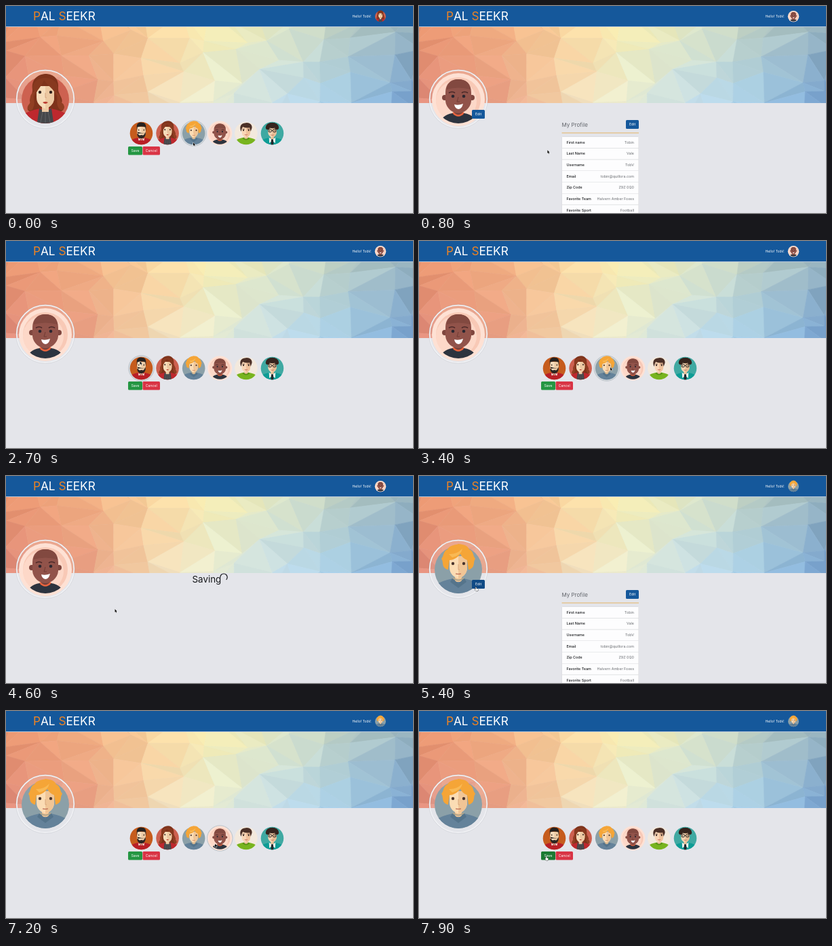
Animation, 600 px wide and 305 px high, one loop 8 s. Source, as an HTML page with a canvas:

```html
<!DOCTYPE html>
<html lang="en">
<head>
<meta charset="utf-8">
<title>Profile avatar picker</title>
<style>
html, body { margin: 0; width: 100%; height: 100%; overflow: hidden; background: #e4e5ea; }
canvas { display: block; width: 600px; height: 305px; }
</style>
</head>
<body>
<canvas id="stage"></canvas>
<script>
const W = 600, H = 305, LOOP = 8000, STEP = 100;
const BLUE = '#15589b';
const stage = document.getElementById('stage');
const g = stage.getContext('2d');
const dpr = window.devicePixelRatio || 1;
stage.width = W * dpr;
stage.height = H * dpr;

// ---- drawing helpers ----
function rect(x, y, w, h, c, r = 0) {
  g.fillStyle = c;
  g.beginPath();
  g.roundRect(x, y, w, h, r);
  g.fill();
}
function ell(x, y, rx, ry, c) {
  g.fillStyle = c;
  g.beginPath();
  g.ellipse(x, y, rx, ry, 0, 0, 7);
  g.fill();
}
const disc = (x, y, r, c) => ell(x, y, r, r, c);
function ring(x, y, r, w, c, from = 0, to = Math.PI * 2) {
  g.strokeStyle = c;
  g.lineWidth = w;
  g.beginPath();
  g.arc(x, y, r, from, to);
  g.stroke();
}
function shape(d, c) {
  g.fillStyle = c;
  g.fill(new Path2D(d));
}
function line(d, w, c) {
  g.strokeStyle = c;
  g.lineWidth = w;
  g.stroke(new Path2D(d));
}
function text(s, x, y, size, c, align = 'left', weight = 400) {
  g.font = `${weight} ${size}px Inter, Roboto, sans-serif`;
  g.textAlign = align;
  g.fillStyle = c;
  g.fillText(s, x, y);
  return g.measureText(s).width;
}
function button(s, x, y, w, h, c) {
  rect(x, y, w, h, c, 1.5);
  text(s, x + w / 2, y + h / 2 + 1.9, 5.2, '#fff', 'center');
}
function clipped(path, draw) {
  g.save();
  g.clip(path);
  draw();
  g.restore();
}

// ---- low-poly banner ----
const TOP = ['e9946f', 'f0a97f', 'f8cf9a', 'f8f0b6', 'e2e9c8', 'b9cdc6', '93b0bd'];
const LOW = ['e08a7a', 'ec9f85', 'f5cfa6', 'ebefd4', 'c6e0ec', 'a0cae5', '759fcd'];
const rgb = h => [0, 2, 4].map(i => parseInt(h.slice(i, i + 2), 16));
const mix = (a, b, k) => a.map((v, i) => v + (b[i] - v) * k);

function tone(x, y) {
  const u = Math.min(Math.max(x / 100, 0), 5.999), i = Math.floor(u);
  const at = row => mix(rgb(row[i]), rgb(row[i + 1]), u - i);
  return mix(at(TOP), at(LOW), Math.min(Math.max((y - 31) / 112, 0), 1));
}
let seed = 29;
function rand() {
  seed = (seed * 16807) % 2147483647;
  return seed / 2147483647;
}
const facets = [];
{
  const cols = 16, rows = 5, pts = [];
  for (let j = 0; j <= rows; j++) {
    for (let i = 0; i <= cols; i++) {
      pts.push([(i - 1) * 43 + (rand() - .5) * 32, 14 + j * 30 + (rand() - .5) * 22]);
    }
  }
  const add = (...tri) => {
    const cx = (tri[0][0] + tri[1][0] + tri[2][0]) / 3;
    const cy = (tri[0][1] + tri[1][1] + tri[2][1]) / 3;
    const d = (rand() - .5) * 13;
    const c = tone(cx + (rand() - .5) * 16, cy).map(v => Math.round(Math.min(255, v + d)));
    facets.push([tri, `rgb(${c})`]);
  };
  for (let j = 0; j < rows; j++) {
    for (let i = 0; i < cols; i++) {
      const n = j * (cols + 1) + i;
      const a = pts[n], b = pts[n + 1], c = pts[n + cols + 1], d = pts[n + cols + 2];
      if (rand() < .5) { add(a, b, c); add(b, c, d); }
      else { add(a, b, d); add(a, c, d); }
    }
  }
}
function banner() {
  const box = new Path2D();
  box.rect(0, 31, W, 112);
  clipped(box, () => {
    g.lineWidth = .6;
    for (const [tri, c] of facets) {
      g.fillStyle = g.strokeStyle = c;
      g.beginPath();
      for (const p of tri) g.lineTo(...p);
      g.closePath();
      g.fill();
      g.stroke();
    }
  });
}

// ---- avatars, drawn around 0,0 with radius 35 ----
const round = new Path2D();
round.arc(0, 0, 35, 0, 7);
const rightHalf = new Path2D();
rightHalf.rect(0, -50, 50, 100);
const FACE = 'M-13-20H13V-3C13 6 6 12 0 13C-6 12-13 6-13-3Z';
const SHOULDERS = 'M-38 40L-32 22Q-27 17-8 13H8Q27 17 32 22L38 40Z';

function head(light, dark) {
  rect(-5, 6, 10, 12, dark);
  shape(FACE, light);
  clipped(rightHalf, () => shape(FACE, dark));
}
function eyes(y, c = '#33241f', r = 2.2) {
  disc(-8, y, r, c);
  disc(8, y, r, c);
}
const body = c => clipped(round, () => shape(SHOULDERS, c));

const avatars = {
  beard() {
    disc(0, 0, 35, '#c65c1d');
    body('#b91f27');
    head('#f6dcbc', '#eccba5');
    shape('M-14-5V-18C-15-30-8-34 2-33C13-33 16-26 14-5L12-19Q0-23-12-19Z', '#26211f');
    shape('M-13-4L-10 1Q0-1 10 1L13-4V3C12 11 6 16 0 16C-6 16-12 11-13 3L-10 1Q-7 8-4 6Q0 4 4 6Q7 8 10 1Z', '#2c2522');
    shape('M-10 14L0 22L10 14L8 23L0 19L-8 23Z', '#efe3d8');
    eyes(-10, '#33241f', 1.8);
  },
  redhead() {
    disc(0, 0, 35, '#cd6150');
    shape('M-20 6C-27 1-18-7-19-15C-21-31-10-38 2-38C15-37 20-28 19-17C18-8 27-3 24 5C31 10 27 18 20 18H-19C-29 17-28 11-20 6Z', '#7e331b');
    body('#be282e');
    shape('M-9 13L0 17L9 13L12 33Q0 37-12 33Z', '#45474a');
    line('M-4 18L-7 33M4 18L7 33M0 18V34', .7, '#6c6d70');
    head('#f6dcba', '#edc9a2');
    shape('M-16-4C-13-14-5-20-2-29C3-20 13-17 16-5L19-18C15-37-16-37-19-18Z', '#87391f');
    shape('M-14-14C-21-5-13 3-18 12C-19 19-30 16-25 8C-19 3-26-3-19-10Z M14-12C21-4 14 4 20 13C24 19 31 13 26 6C20 2 25-4 18-10Z', '#913f23');
    eyes(-11);
    line('M0-10V-3H2', .9, '#d3a17b');
    shape('M-4 4Q0 2 4 4Q0 8-4 4Z', '#bb3a30');
  },
  blond() {
    disc(0, 0, 35, '#8ba0a8');
    body('#64829a');
    head('#fbdcb4', '#f0c596');
    shape('M-9 13L0 20L9 13L12 18L0 27L-12 18Z', '#55748b');
    line('M-8 12Q0 19 8 12', 1.8, '#b0a58b');
    shape('M-15 0C-26-3-21-11-25-16C-21-20-23-27-16-30C-12-37-4-36 0-38C6-37 13-37 16-30C23-27 21-21 25-16C21-11 26-3 15 0L13-14C8-16 5-19 3-23C-2-17-8-14-13-14Z', '#f5a537');
    shape('M-14-23Q-3-22 6-31Q4-21-9-18Z', '#f9b954');
    eyes(-9, '#4b352d');
    line('M0-8V0H2', .8, '#d3a077');
    line('M-4 6Q0 7 4 6', 1.2, '#b8664f');
  },
  bald() {
    disc(0, 0, 39, '#fee1d4');
    disc(0, 0, 33, '#f8c9b6');
    disc(-3, 2, 30, '#fdd8c8');
    clipped(round, () => shape('M-27 37Q-26 23-9 20H9Q26 23 27 37Z', '#2d343f'));
    rect(-7, 9, 14, 14, '#74403a');
    disc(-20, -3, 4, '#7f463e');
    disc(20, -3, 4, '#7f463e');
    shape('M-19-10C-19-25-10-30 0-30C11-30 19-24 19-10V2C18 13 8 20 0 20C-8 20-18 13-19 2Z', '#91534a');
    shape('M-18-15C-14-28-6-30 0-30C10-30 17-25 18-15Q0-20-18-15Z', '#824940');
    line('M-8 19Q0 28 8 19', 2.6, '#e9653f');
    line('M-14-10Q-9-13-5-10M5-10Q9-13 14-10', 1.6, '#4a2827');
    eyes(-5, '#2b2730', 2.3);
    line('M0-4L-2 3H2', 1, '#713b34');
    shape('M-6 7Q0 9 7 6Q5 14 0 14Q-5 13-6 7Z', '#fff');
  },
  green() {
    disc(0, 0, 35, '#f3e9dd');
    body('#78b41f');
    head('#f9d6b6', '#f0c29c');
    shape('M-8 13Q0 21 8 13L11 16Q0 26-11 16Z', '#5b9118');
    shape('M-15-5C-21-16-18-30-4-31C6-35 20-29 18-16L14-5L11-17Q-2-15-10-20L-13-14Z', '#4b3027');
    line('M-11-13H-4M4-13H11', 1.5, '#4b3027');
    eyes(-9);
    line('M-4 4Q0 7 4 4', 1.6, '#b94e42');
  },
  curly() {
    disc(0, 0, 35, '#3fa9a2');
    body('#0d9c95');
    head('#f4d5b3', '#e8be96');
    shape('M-10 13L0 20L10 13L9 30L0 23L-9 30Z', '#f2f0eb');
    shape('M-3 19H3L4 35H-4Z', '#25282b');
    for (let i = 0; i < 9; i++) {
      const a = Math.PI * (1 + i / 8);
      disc(Math.cos(a) * 14, -17 + Math.sin(a) * 10, 6, '#35241e');
    }
    ell(0, -22, 13, 7, '#35241e');
    ring(-7, -8, 5, 2, '#2c2725');
    ring(7, -8, 5, 2, '#2c2725');
    line('M-3-8H3', 1.6, '#2c2725');
    eyes(-8, '#2c2725', 1.6);
    line('M-4 5Q0 7 4 5', 1.4, '#a94b3e');
  }
};
function avatar(name, x, y, r) {
  g.save();
  g.translate(x, y);
  g.scale(r / 35, r / 35);
  avatars[name]();
  g.restore();
}

// ---- timeline ----
const views = [
  [0, 'pick', 'redhead'], [400, 'saving', 'redhead'], [700, 'profile', 'bald'],
  [2100, 'pick', 'bald'], [4300, 'saving', 'bald'],
  [4800, 'profile', 'blond'], [5600, 'pick', 'blond']
];
const moves = [
  [0, 276, 201], [300, 189, 213], [1100, 189.5, 212],
  [1800, 82.5, 163.5], [2300, 82.5, 163.5], [3000, 272, 186], [3400, 282, 186],
  [3800, 280, 187], [4150, 189, 213], [4400, 188, 212], [4600, 160.5, 196],
  [5200, 84, 163.5], [5600, 83, 163.5], [6100, 350, 188], [6300, 364.5, 186],
  [6900, 364, 187], [7700, 187, 214], [8000, 187, 214]
];
function pointerAt(t) {
  const i = moves.findIndex(m => m[0] > t);
  const a = moves[i - 1], b = moves[i];
  const k = (t - a[0]) / (b[0] - a[0]), e = k * k * (3 - 2 * k);
  return [a[1] + (b[1] - a[1]) * e, a[2] + (b[2] - a[2]) * e];
}
const over = ([px, py], x, y, w, h) => px >= x && px <= x + w && py >= y && py <= y + h;

function cursor([x, y], hand) {
  g.save();
  g.translate(x, y);
  const p = new Path2D(hand
    ? 'M0 0Q.9-.3 1 .7V2.3L3 2.8Q3.8 3 3.6 4L3.1 6H.4L-1.4 3.6Q-1 2.8 0 3.5Z'
    : 'M0 0V4.8L1.1 3.9L1.9 5.6L2.7 5.2L1.9 3.6L3.3 3.4Z');
  g.lineWidth = .9;
  g.strokeStyle = hand ? '#222' : '#fff';
  g.stroke(p);
  g.fillStyle = hand ? '#fff' : '#111';
  g.fill(p);
  g.restore();
}

// ---- screens ----
const fields = [
  ['First name', 'Tobin'], ['Last Name', 'Vale'], ['Username', 'TobV'],
  ['Email', 'tobin@quillora.com'], ['Zip Code', 'Z9Z 0Q0'],
  ['Favorite Team', 'Halvern Amber Foxes'], ['Favorite Sport', 'Football']
];
function header(user) {
  rect(0, 0, W, 30.3, BLUE);
  let x = 40;
  for (const [s, c] of [['P', '#ee8322'], ['AL ', '#fff'], ['S', '#ee8322'], ['EEKR', '#fff']]) {
    x += text(s, x, 21, 17.2, c);
  }
  text('Hello! TobV.', 539, 17.2, 5.1, '#fff', 'right');
  avatar(user, 552, 15.3, user === 'bald' ? 7.4 : 8);
}
function profile(p) {
  const shade = hit => hit ? '#104a85' : BLUE;
  button('Edit', 78, 153, 19, 13, shade(over(p, 78, 153, 19, 13)));
  text('My Profile', 210.5, 178, 8, '#63666c');
  button('Edit', 305, 168, 19, 13, BLUE);
  rect(210.5, 186.6, 113.5, .9, '#e5b566');
  rect(210.5, 192.5, 113.5, 120, '#d9dadd', 1.5);
  fields.forEach(([label, value], i) => {
    const y = 193 + i * 16.7;
    rect(211, y, 112.5, 16.1, '#fdfdfe');
    text(label, 217.5, y + 9.5, 5.4, '#17191c', 'left', 500);
    text(value, 317, y + 9.5, 5.4, '#6b6e73', 'right');
  });
}
function picker(p) {
  Object.keys(avatars).forEach((name, i) => {
    const x = 199.5 + i * 38.6, y = 187.5;
    if (Math.hypot(p[0] - x, p[1] - y) < 17) {
      disc(x, y, 19, '#d3d9de');
      ring(x, y, 18.7, 1, '#bdc4ca');
    }
    avatar(name, x, y, name === 'bald' ? 16.2 : 16.8);
  });
  button('Save', 180, 207, 21, 12.5, over(p, 180, 207, 21, 12.5) ? '#1b7a33' : '#249643');
  button('Cancel', 201.5, 207, 25.5, 12.5, '#d93445');
}
function saving(t) {
  text('Saving', 274.5, 157, 13.4, '#15171a');
  const a = Math.PI * (1 + (t - 4600) / 375);
  ring(321, 149.2, 5.2, 1.2, '#15171a', a, a + Math.PI * 1.25);
}

function draw(now) {
  const t = Math.floor((now % LOOP) / STEP) * STEP;
  const [, view, user] = views.filter(v => v[0] <= t).pop();
  const p = pointerAt(t);
  g.setTransform(dpr, 0, 0, dpr, 0, 0);
  rect(0, 0, W, H, '#e4e5ea');
  banner();
  header(user);
  disc(58, 137, 43, 'rgba(228,229,234,.15)');
  avatar(user, 58, 138, 35);
  ring(58, 137, 42.3, 1.8, '#f1f2f5');
  ring(58, 137, 43.4, .5, 'rgba(150,155,165,.4)');
  if (view === 'profile') profile(p);
  else if (view === 'pick') picker(p);
  else saving(t);
  const hand = view === 'profile' ? over(p, 78, 153, 19, 13)
    : view === 'pick' && over(p, 180, 207, 47, 12.5);
  cursor(p, hand);
}

const start = performance.now();
function tick() {
  draw(performance.now() - start);
  requestAnimationFrame(tick);
}
tick();
</script>
</body>
</html>
```
